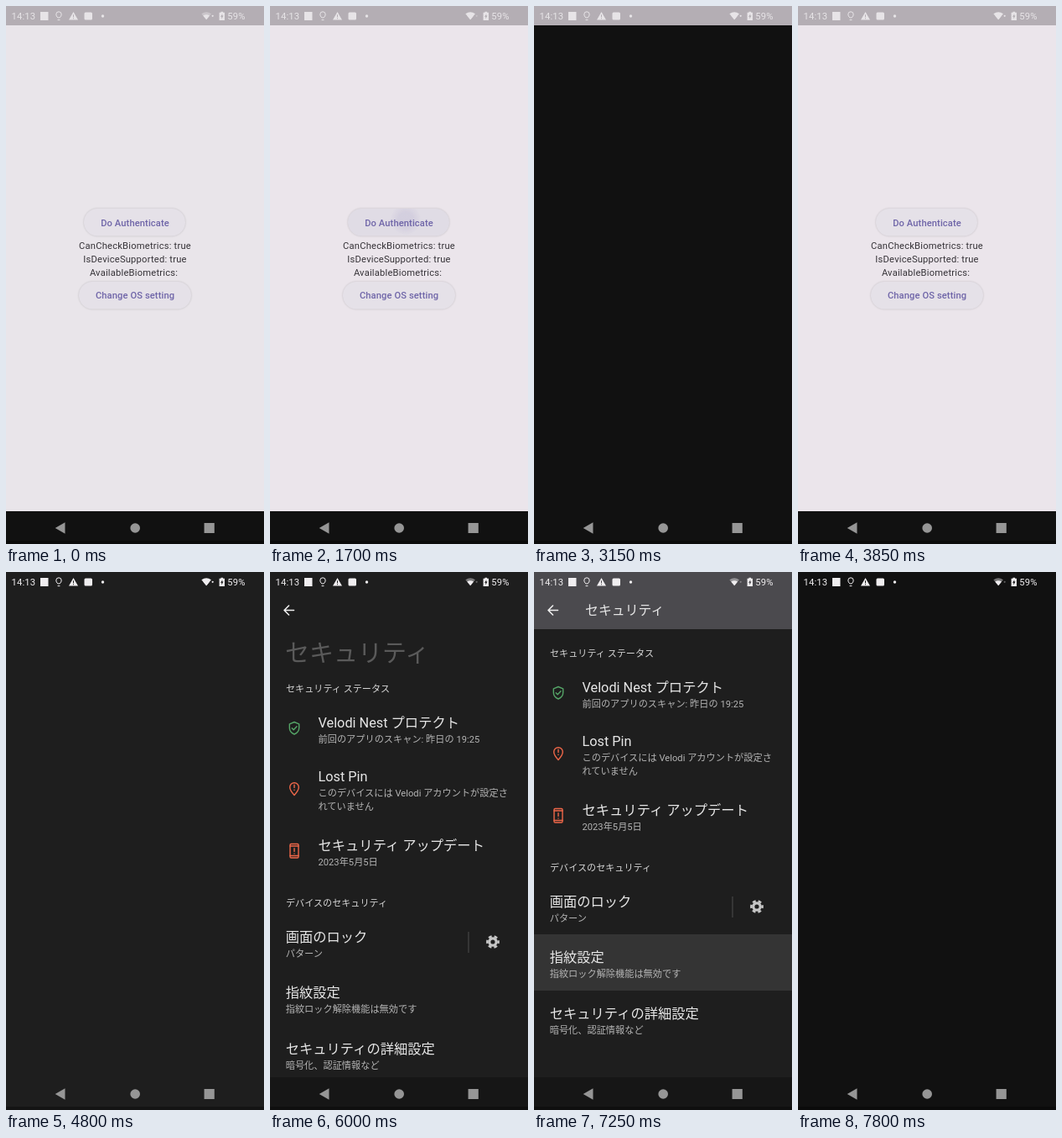
Recreate the animation shown at these times as an HTML page. Size 308 by 640 pixels, loop 8 s.

```html
<!DOCTYPE html>
<html lang="ja">
<head>
<meta charset="utf-8">
<title>Security settings</title>
<style>
  html, body { margin: 0; width: 100%; height: 100%; overflow: hidden; background: #111; }
  svg { display: block; width: 100vw; height: 100vh; }
  text { font-family: Roboto, "Noto Sans CJK JP", "Noto Sans CJK", sans-serif; white-space: pre; }

  .anim { animation: 8s step-end infinite; }

  /* Start screen */
  .label { font-size: 11.2px; letter-spacing: .2px; text-anchor: middle; fill: #363338; }
  .action { font-size: 11.2px; font-weight: 500; letter-spacing: .08px; text-anchor: middle; fill: #6f65a8; }
  .button { fill: #e5e1e8; filter: drop-shadow(0 .8px .8px rgba(0, 0, 0, .18)); }
  #paper { fill: #e9e5ea; animation-name: paper; }
  #tapAuth { opacity: 0; animation-name: tapAuth; }
  #tapSetting { opacity: 0; animation-name: tapSetting; }
  #prompt { opacity: 0; animation-name: prompt; }
  @keyframes paper { 21.25% { fill: #ebe5eb; } }
  @keyframes tapAuth { 21.25% { opacity: 1; } 21.875% { opacity: 0; } }
  @keyframes tapSetting { 56.25% { opacity: 1; } 58.75% { opacity: 0; } }
  @keyframes prompt { 21.875% { opacity: 1; } 48.125% { opacity: 0; } }

  /* Settings screen */
  .head { font-size: 11.1px; fill: #d6d6d6; }
  .name { font-size: 16.3px; fill: #e6e6e6; }
  .note { font-size: 11.2px; fill: #b4b4b4; }
  .line { fill: none; stroke-width: 1.4; stroke-linejoin: round; stroke-linecap: round; }
  #settings { opacity: 0; animation-name: settings; }
  #page { opacity: 0; animation-name: page; }
  #rest { opacity: 0; animation-name: rest; }
  #list { transform: translateY(104px); animation-name: scroll; }
  #bigTitle { font-size: 29px; fill: #e6e6e6; animation-name: bigTitle; }
  #bar { opacity: 0; animation-name: bar; }
  #navShade { opacity: 0; animation-name: rest; }
  #touch { opacity: 0; animation-name: touch; }
  #pressed { opacity: 0; animation-name: pressed; }
  #next { opacity: 0; animation-name: next; }
  @keyframes settings { 58.75% { opacity: .5; } 60% { opacity: 1; } }
  @keyframes page { 65.625% { opacity: 1; } }
  @keyframes rest { 67.5% { opacity: 1; } }
  @keyframes scroll { 75% { transform: translateY(42px); } 76.25% { transform: none; } }
  @keyframes bigTitle { 75% { opacity: .3; transform: translateY(-40px); } 76.25% { opacity: 0; } }
  @keyframes bar { 76.25% { opacity: 1; } }
  @keyframes touch { 88.75% { opacity: 1; } 90.625% { opacity: 0; } }
  @keyframes pressed { 90.625% { opacity: 1; } }
  @keyframes next {
    92.5% { opacity: .5; transform: translateX(13px); }
    95% { opacity: 1; transform: translateX(10px); }
    97.5% { opacity: 1; transform: none; }
  }

  /* Status bar */
  #status { fill: #f0eef0; opacity: .85; animation-name: status; }
  .clock { font-size: 11.3px; letter-spacing: .1px; }
  #fan { opacity: .45; animation-name: fan; }
  #traffic { animation-name: traffic; }
  @keyframes status { 58.75% { opacity: 1; } }
  @keyframes fan { 10.625% { opacity: 1; } 65.625% { opacity: .45; } }
  @keyframes traffic { 10.625% { opacity: .35; } 39.375% { opacity: 1; } 65.625% { opacity: .35; } }
</style>
</head>
<body>
<svg viewBox="0 0 308 640" preserveAspectRatio="none">
  <defs>
    <clipPath id="authShape"><rect x="93" y="241" width="121" height="32.5" rx="16.2"/></clipPath>
    <clipPath id="settingShape"><rect x="87" y="328" width="134" height="32.5" rx="16.2"/></clipPath>
    <clipPath id="listArea"><rect y="68" width="308" height="533"/></clipPath>
    <clipPath id="rowArea"><rect y="431" width="308" height="67"/></clipPath>
    <radialGradient id="ripple">
      <stop offset=".45" stop-color="#6a5fa6" stop-opacity=".11"/>
      <stop offset="1" stop-color="#6a5fa6" stop-opacity="0"/>
    </radialGradient>
  </defs>

  <g id="start">
    <rect id="paper" class="anim" width="308" height="640"/>
    <rect class="button" x="93" y="241" width="121" height="32.5" rx="16.2"/>
    <g id="tapAuth" class="anim" clip-path="url(#authShape)">
      <rect x="93" y="241" width="121" height="33" fill="#6a5fa6" opacity=".03"/>
      <circle cx="162" cy="254" r="19" fill="url(#ripple)"/>
    </g>
    <text class="action" x="154" y="261.6">Do Authenticate</text>
    <text class="label" x="154" y="289">CanCheckBiometrics: true</text>
    <text class="label" x="154" y="305">IsDeviceSupported: true</text>
    <text class="label" x="152.5" y="321">AvailableBiometrics:</text>
    <rect class="button" x="87" y="328" width="134" height="32.5" rx="16.2"/>
    <g id="tapSetting" class="anim" clip-path="url(#settingShape)">
      <rect x="87" y="328" width="134" height="33" fill="#6a5fa6" opacity=".03"/>
      <circle cx="180" cy="341" r="19" fill="url(#ripple)"/>
    </g>
    <text class="action" x="154" y="348.4">Change OS setting</text>
    <rect id="prompt" class="anim" y="23" width="308" height="617" fill="#111"/>
    <rect width="308" height="23" fill="#b4aeb4"/>
    <rect y="601" width="308" height="39" fill="#111"/>
  </g>

  <g id="settings" class="anim">
    <rect width="308" height="640" fill="#1e1e1e"/>
    <rect id="navShade" class="anim" y="601" width="308" height="39" fill="#161616"/>
    <g id="page" class="anim">
      <text id="bigTitle" class="anim" x="18" y="147">セキュリティ</text>
      <g clip-path="url(#listArea)">
        <g id="list" class="anim">
          <g clip-path="url(#rowArea)" fill="#fff" fill-opacity=".1">
            <circle id="touch" class="anim" cx="162" cy="465" r="76"/>
            <rect id="pressed" class="anim" y="431" width="308" height="67"/>
          </g>
          <text class="head" x="19" y="100.5">セキュリティ ステータス</text>
          <g class="line" stroke="#55a567">
            <path d="M29 136.5l5.7 2.3v4.6q0 5-5.7 7.6q-5.7-2.6-5.7-7.6v-4.6z"/>
            <path d="M26.2 143.8l2 2l3.8-4"/>
          </g>
          <text class="name" x="57.5" y="142.7">Velodi Nest プロテクト</text>
          <text class="note" x="57.5" y="160.7">前回のアプリのスキャン: 昨日の 19:25</text>
          <g class="line" stroke="#ee6749">
            <path d="M29 223.5q-5.3-5.6-5.3-9.4a5.3 5.3 0 0 1 10.6 0q0 3.8-5.3 9.4z"/>
            <path d="M29 211.2v3.4M29 217.3v.1"/>
          </g>
          <text class="name" x="57.5" y="207.3">Lost Pin</text>
          <text class="note" x="57.5" y="224.7">このデバイスには Velodi アカウントが設定さ</text>
          <text class="note" x="57.5" y="240.7">れていません</text>
          <g id="rest" class="anim">
            <g class="line" stroke="#ee6749">
              <rect x="24" y="281.5" width="10" height="16.5" rx="1.2"/>
              <path d="M24 284h10M24 295.5h10M29 286.8v3.6M29 293v.1"/>
            </g>
            <text class="name" x="57.5" y="288.7">セキュリティ アップデート</text>
            <text class="note" x="57.5" y="306.7">2023年5月5日</text>
            <text class="head" x="19" y="355.5">デバイスのセキュリティ</text>
            <text class="name" x="18.7" y="398">画面のロック</text>
            <text class="note" x="18.7" y="416">パターン</text>
            <path d="M237 386v25" stroke="#4c4c4c"/>
            <g fill="none" stroke="#c6c6c6">
              <circle cx="266" cy="398" r="4.2" stroke-width="3.2"/>
              <circle cx="266" cy="398" r="6.6" stroke-width="2.6" stroke-dasharray="3.9 3.01" stroke-dashoffset="1.95"/>
            </g>
            <text class="name" x="18.7" y="464.2">指紋設定</text>
            <text class="note" x="18.7" y="482">指紋ロック解除機能は無効です</text>
            <text class="name" x="18.7" y="530.5">セキュリティの詳細設定</text>
            <text class="note" x="18.7" y="548.5">暗号化、認証情報など</text>
          </g>
        </g>
      </g>
      <g id="bar" class="anim">
        <rect width="308" height="68" fill="#4b4a4e"/>
        <text x="61" y="51.3" font-size="15.9" fill="#e6e6e6">セキュリティ</text>
      </g>
      <path class="line" stroke="#eee" style="stroke-width:1.6" d="M28.5 45.5H17M22.5 40l-5.5 5.5l5.5 5.5"/>
    </g>
  </g>

  <rect id="next" class="anim" width="308" height="640" fill="#111"/>

  <g id="status" class="anim">
    <text class="clock" x="6.5" y="16">14:13</text>
    <rect x="41" y="7" width="9.5" height="10"/>
    <path class="line" stroke="#f0eef0" style="stroke-width:1" d="M61.5 13.6q-1.7-1.6-1.7-3.6a3.2 3.2 0 0 1 6.4 0q0 2-1.7 3.6zM62 16.6h2"/>
    <path fill-rule="evenodd" d="M80.5 7l5.5 9.5H75zM80 10.2v3h1v-3zM80 14.2v1h1v-1z"/>
    <rect x="93.5" y="7.5" width="9.5" height="9" rx="1.5"/>
    <circle cx="115.5" cy="12" r="1.7"/>
    <path id="fan" class="anim" d="M239.2 16.3L233.4 9.3Q239.2 5 245 9.3z"/>
    <path d="M239.2 16.3L235.3 11.5Q239.2 9 243.1 11.5z"/>
    <circle id="traffic" class="anim" cx="246.7" cy="11.8" r="1.1"/>
    <path fill-rule="evenodd" d="M256.5 6.8h2.6v1h1.9v9.2h-6.4V7.8h1.9zM258.3 9.4l-2.2 3.4h1.3v2.4l2.2-3.6h-1.3z"/>
    <text class="clock" x="264.3" y="16">59%</text>
  </g>

  <g id="nav" fill="#969696">
    <rect y="636" width="308" height="4" fill="#000" opacity=".3"/>
    <path d="M58.7 621L70.5 614.3v13.4z"/>
    <circle cx="154.2" cy="621" r="5.8"/>
    <rect x="236.6" y="615" width="12.2" height="12"/>
  </g>
</svg>
</body>
</html>
```
